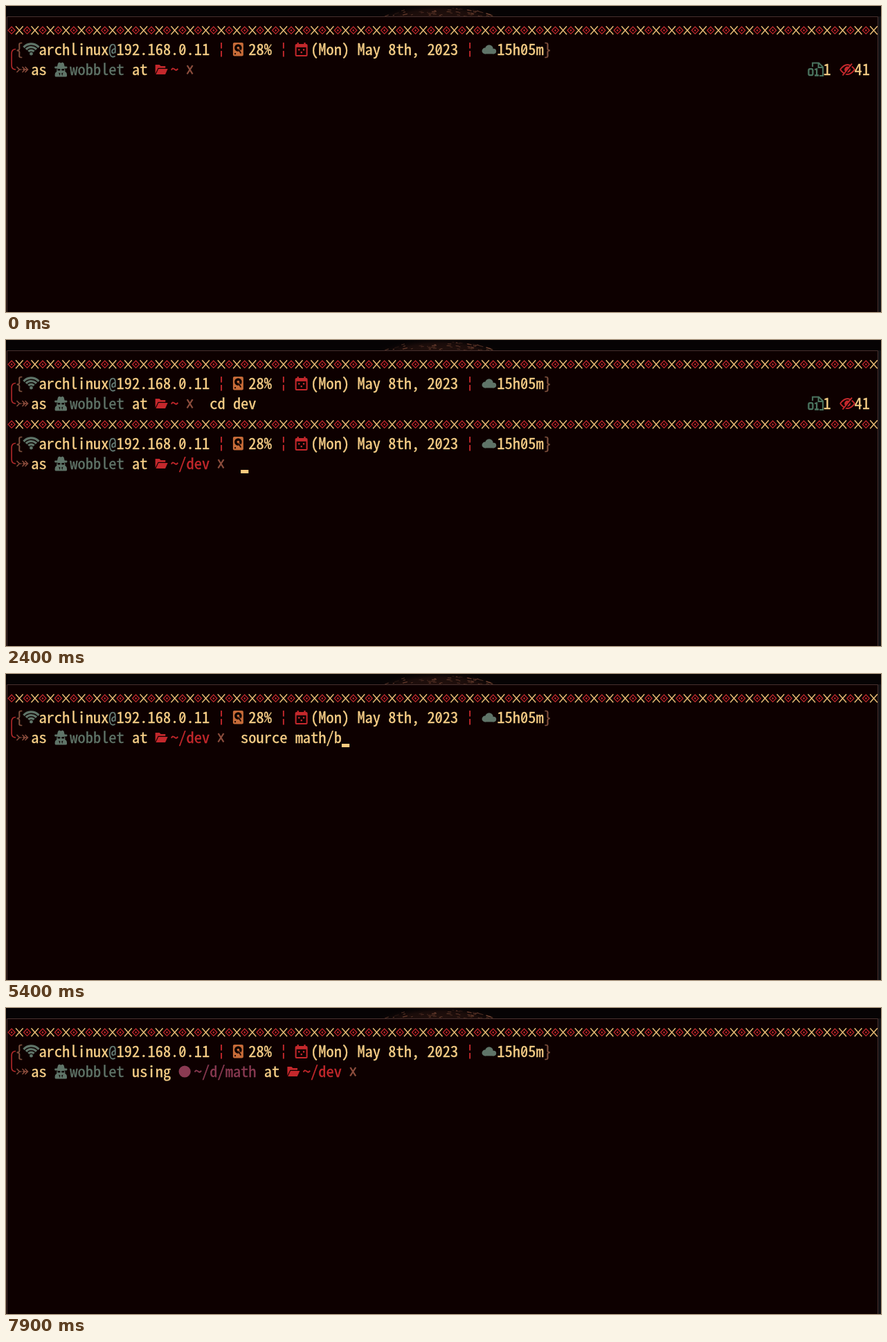
An HTML page with a canvas that plays this animation: 1264x443 px, repeating every 8 s.

```html
<!DOCTYPE html>
<html lang="en">
<head>
<meta charset="utf-8">
<title>Terminal prompt</title>
<style>
html, body { margin: 0; width: 100%; height: 100%; overflow: hidden; background: #080303; }
canvas { display: block; width: 1264px; height: 443px; }
</style>
</head>
<body>
<canvas id="stage" width="1264" height="443"></canvas>
<script>
const ctx = document.getElementById('stage').getContext('2d');
const LOOP = 8000, CELL = 11.22, LEFT = 2.5, COLS = 112, PROMPT_H = 87;
const FAMILY = '"Noto Sans Mono CJK JP", "Noto Sans Mono CJK SC", "Noto Sans Mono", monospace';
const BG = '#0d0000', SAND = '#f7cf87', RED = '#c4282c', SAGE = '#5f7468',
  BROWN = '#8b4c3c', ORANGE = '#c66b38', PLUM = '#8a3a52', GREEN = '#4b7560';
const USER = 'wobblet';

// Fit the font's natural advance to the terminal cell.
ctx.font = '100px ' + FAMILY;
const FONT = (CELL / ctx.measureText('0').width * 100).toFixed(2) + 'px ' + FAMILY;

const colX = col => LEFT + col * CELL;

function stroke(color, width, ...lines) {
  ctx.strokeStyle = color;
  ctx.lineWidth = width;
  ctx.beginPath();
  for (const line of lines) {
    line.forEach(([x, y], i) => i ? ctx.lineTo(x, y) : ctx.moveTo(x, y));
  }
  ctx.stroke();
}

function poly(color, ...points) {
  ctx.fillStyle = color;
  ctx.beginPath();
  points.forEach(([x, y]) => ctx.lineTo(x, y));
  ctx.fill();
}

function disc(color, x, y, r) {
  ctx.fillStyle = color;
  ctx.beginPath();
  ctx.arc(x, y, r, 0, Math.PI * 2);
  ctx.fill();
}

function box(color, x, y, w, h, r = 0) {
  ctx.fillStyle = color;
  ctx.beginPath();
  ctx.roundRect(x, y, w, h, r);
  ctx.fill();
}

function text(str, col, base, color) {
  ctx.font = FONT;
  ctx.textAlign = 'center';
  [...str].forEach((ch, i) => {
    const x = colX(col + i + 0.5);
    ctx.fillStyle = ctx.strokeStyle = color;
    ctx.lineWidth = 0.35;
    ctx.fillText(ch, x, base);
    ctx.strokeText(ch, x, base);
    if (ch === '0') stroke(color, 1.6, [[x - 1.7, base - 4.6], [x + 1.7, base - 11.4]]);
  });
}

// Icons: x is the left edge, y the middle of the row.
const icons = {
  wifi(x, y) {
    const cx = x + 11.5, cy = y + 6.5;
    ctx.strokeStyle = SAGE;
    ctx.lineWidth = 3.2;
    for (const r of [5.4, 10, 14.6]) {
      ctx.beginPath();
      ctx.arc(cx, cy, r, -Math.PI * 0.77, -Math.PI * 0.23);
      ctx.stroke();
    }
    disc(SAGE, cx, cy - 0.3, 2.4);
  },
  disk(x, y) {
    box(ORANGE, x, y - 10, 15, 19.5, 2);
    disc(BG, x + 7.5, y - 2.5, 5.3);
    disc(ORANGE, x + 7.5, y - 2.5, 1.8);
    stroke(ORANGE, 2.6, [[x + 8, y - 1], [x + 12.5, y + 6]]);
    stroke(BG, 1.5, [[x + 8, y - 0.5], [x + 11.5, y + 5.5]]);
    disc(BG, x + 3.2, y + 6.2, 1.1);
  },
  calendar(x, y) {
    box(RED, x, y - 8, 18, 18, 2);
    box(RED, x + 3, y - 10, 2.2, 4);
    box(RED, x + 12.8, y - 10, 2.2, 4);
    box(BG, x + 2, y - 3.2, 14, 11.2);
    for (const [dx, dy] of [[4.5, 0], [11.3, 0], [8, 3.8]]) {
      box(RED, x + dx, y + dy - 0.8, 2.3, 2.3);
    }
  },
  cloud(x, y) {
    disc(SAGE, x + 5, y + 2, 4.4);
    disc(SAGE, x + 11, y - 1, 5.8);
    disc(SAGE, x + 17.5, y + 2.6, 3.8);
    box(SAGE, x + 5, y, 12.5, 6.4);
  },
  spy(x, y) {
    poly(SAGE, [x + 3.8, y - 3], [x + 5.2, y - 9], [x + 7, y - 10.5], [x + 9.5, y - 9.6],
      [x + 12, y - 10.5], [x + 13.8, y - 9], [x + 15.2, y - 3]);
    box(SAGE, x + 0.3, y - 4.4, 18.4, 2.8, 1.4);
    box(SAGE, x + 3.4, y - 2, 12.2, 7, 3);
    box(SAGE, x + 0.8, y + 2.4, 17.4, 8, [5, 5, 1.5, 1.5]);
    box(BG, x + 4.6, y - 0.9, 4, 2.3, 1);
    box(BG, x + 10.4, y - 0.9, 4, 2.3, 1);
    poly(BG, [x + 6.4, y + 4.6], [x + 8.6, y + 5.6], [x + 7.6, y + 9]);
    poly(BG, [x + 12.6, y + 4.6], [x + 10.4, y + 5.6], [x + 11.4, y + 9]);
  },
  folder(x, y) {
    poly(RED, [x, y + 6], [x, y - 7], [x + 6, y - 7], [x + 8, y - 5], [x + 14.6, y - 5],
      [x + 14.6, y - 2.2], [x + 4, y - 2.2]);
    poly(RED, [x + 4.6, y - 1], [x + 18, y - 1], [x + 14.4, y + 7], [x + 0.8, y + 7]);
  },
  env(x, y) {
    disc(PLUM, x + 8.8, y, 8.6);
  },
  binary(x, y) {
    stroke(GREEN, 2, [[x + 7, y - 4], [x + 7, y - 9.5], [x + 16, y - 9.5], [x + 22, y - 3.5],
      [x + 22, y + 9], [x + 17, y + 9]], [[x + 15.5, y - 9], [x + 15.5, y - 3], [x + 22, y - 3]]);
    ctx.strokeStyle = GREEN;
    ctx.lineWidth = 2.3;
    ctx.beginPath();
    ctx.roundRect(x + 1.3, y - 0.8, 6, 9, 2);
    ctx.stroke();
    stroke(GREEN, 2.3, [[x + 10, y], [x + 13, y - 0.8], [x + 13, y + 8]],
      [[x + 10, y + 8.5], [x + 16, y + 8.5]]);
  },
  hidden(x, y) {
    ctx.strokeStyle = RED;
    ctx.lineWidth = 2;
    ctx.beginPath();
    ctx.moveTo(x + 2, y);
    ctx.quadraticCurveTo(x + 12.5, y - 14, x + 23, y);
    ctx.quadraticCurveTo(x + 12.5, y + 14, x + 2, y);
    ctx.stroke();
    disc(RED, x + 12.5, y, 4.4);
    stroke(BG, 2, [[x + 7, y + 9], [x + 20.5, y - 8]]);
    stroke(RED, 2, [[x + 5.5, y + 8.5], [x + 19, y - 8.5]]);
  }
};

const icon = (name, col, y) => icons[name](colX(col), y);

function border() {
  for (let i = 0; i < COLS; i++) {
    const x = colX(i + 0.5), y = 35.2;
    if (i % 2) {
      stroke('#e6bb74', 1.5, [[x - 5.3, y - 6], [x + 5.3, y + 6]], [[x + 5.3, y - 6], [x - 5.3, y + 6]]);
    } else {
      stroke('#b8272b', 1.3, [[x - 5, y], [x, y - 5.2], [x + 5, y], [x, y + 5.2], [x - 5, y], [x, y - 5.2]]);
      poly('#b8272b', [x - 1.6, y], [x, y - 1.7], [x + 1.6, y], [x, y + 1.7]);
    }
  }
}

function bar(col) {
  const x = colX(col + 0.5) - 0.9;
  box(RED, x, 53, 1.9, 8.5);
  box(RED, x, 65, 1.9, 8.5);
}

function header() {
  const mid = 63, base = 71;
  text('{', 1, base, '#80523f');
  icon('wifi', 2, mid);
  text('archlinux', 4, base, SAND);
  text('@', 13, base, '#68807a');
  text('192.168.0.11', 14, base, SAND);
  bar(27);
  icon('disk', 29, mid);
  text('28%', 31, base, SAND);
  bar(35);
  icon('calendar', 37, mid);
  text('(Mon) May 8th, 2023', 39, base, SAND);
  bar(59);
  icon('cloud', 61, mid);
  text('15h05m', 63, base, SAND);
  text('}', 69, base, '#80523f');
}

function elbow() {
  ctx.strokeStyle = '#b2292a';
  ctx.lineWidth = 1.6;
  ctx.beginPath();
  ctx.moveTo(14, 62.5);
  ctx.quadraticCurveTo(8.1, 62.5, 8.1, 69);
  ctx.lineTo(8.1, 86);
  ctx.quadraticCurveTo(8.1, 92, 14, 92);
  ctx.stroke();
  const tip = x => [[x, 88], [x + 4, 92], [x, 96]];
  stroke(BROWN, 1.5, tip(15.5), tip(23.5), tip(27.5), [[20.5, 92], [22.5, 92]], [[24, 92], [31, 92]]);
}

// Draws one whole prompt; cursor is optional.
function prompt(top, { path, env, info, typed = '', cursor }) {
  const mid = 92, base = 100;
  ctx.save();
  ctx.translate(0, top);
  border();
  header();
  elbow();
  text('as', 3, base, SAND);
  icon('spy', 6, mid);
  text(USER, 8, base, SAGE);
  let col = 16;
  if (env) {
    text('using', col, base, SAND);
    icon('env', col + 6, mid);
    text(env, col + 8, base, PLUM);
    col += 9 + env.length;
  }
  text('at', col, base, SAND);
  icon('folder', col + 3, mid);
  text(path, col + 5, base, RED);
  col += 6 + path.length;
  const x = colX(col + 0.5) - 0.6;
  stroke(BROWN, 2.3, [[x - 3.8, 86], [x + 4, 98.5]], [[x + 4, 86], [x - 4, 98.5]]);
  col += 3;
  text(typed, col, base, SAND);
  if (cursor) box('#f9cb7f', colX(col + typed.length), 101, CELL, 5);
  if (info) {
    icon('binary', 103, mid);
    text('1', 105, base, SAND);
    icon('hidden', 107, mid);
    text('41', 109, base, SAND);
  }
  ctx.restore();
}

// A dark dome with sparse flecks peeks out above the window.
function backdrop() {
  box('#060304', 0, 0, 1264, 443);
  const glow = ctx.createRadialGradient(0, 0, 0, 0, 0, 100);
  glow.addColorStop(0, '#2a1510');
  glow.addColorStop(0.7, '#1a0c0a');
  glow.addColorStop(1, 'rgba(6,3,4,0)');
  ctx.save();
  ctx.translate(626, 26);
  ctx.scale(1, 0.3);
  disc(glow, 0, 0, 100);
  ctx.restore();
  let seed = 7;
  const random = () => (seed = seed * 16807 % 2147483647) / 2147483647;
  for (let i = 0; i < 70; i++) {
    const x = (random() * 2 - 1) * 88, lift = 24 * Math.sqrt(1 - (x / 92) ** 2);
    const y = 26 - lift * (0.5 + random() * 0.5), len = 2 + random() * 5;
    stroke(`rgba(140,84,62,${0.15 + random() * 0.5})`, 1.2,
      [[626 + x, y], [626 + x + len, y + len * x / 200]]);
  }
  const side = ctx.createLinearGradient(0, 120, 0, 443);
  side.addColorStop(0, '#0e0706');
  side.addColorStop(0.4, '#2e1a15');
  side.addColorStop(1, '#1c100d');
  box(side, 0, 15, 1, 428);
  box('#131214', 1260, 15, 4, 428);
  box(BG, 1, 15, 1259, 428);
  stroke('#47302e', 1, [[1.5, 443], [1.5, 15.5], [1259.5, 15.5], [1259.5, 443]]);
}

// Bursts are [start, keys], one key every 100 ms.
const keys = (t, bursts) => bursts.reduce((sum, [start, n]) =>
  sum + Math.max(0, Math.min(n, Math.floor((t - start) / 100) + 1)), 0);

const CD = 'cd dev', SOURCE = 'source math/bin/activate';
const CD_KEYS = [[800, 1], [1200, 1], [1400, 1], [1600, 2], [1900, 1]];
const SOURCE_KEYS = [[3700, 2], [4100, 2], [4400, 7], [5300, 4], [5900, 3]];

function draw(t) {
  backdrop();
  const home = { path: '~', info: true }, dev = { path: '~/dev' };
  const venv = { path: '~/dev', env: '~/d/math' };
  if (t < 2400) {
    prompt(0, { ...home, typed: CD.slice(0, keys(t, CD_KEYS)), cursor: t >= 300 });
  } else if (t < 3000) {
    prompt(0, { ...home, typed: CD });
    prompt(PROMPT_H, { ...dev, cursor: true });
  } else if (t < 6800) {
    const typed = t < 6300 ? SOURCE.slice(0, keys(t, SOURCE_KEYS)) : SOURCE;
    prompt(0, { ...dev, typed, cursor: t < 3600 || t >= 3700 });
  } else if (t < 7400) {
    prompt(0, { ...dev, typed: SOURCE });
    prompt(PROMPT_H, { ...venv, cursor: true });
  } else {
    prompt(0, { ...venv, cursor: t < 7900 });
  }
}

const begin = performance.now();
function tick() {
  draw((performance.now() - begin) % LOOP);
  requestAnimationFrame(tick);
}
tick();
</script>
</body>
</html>
```
